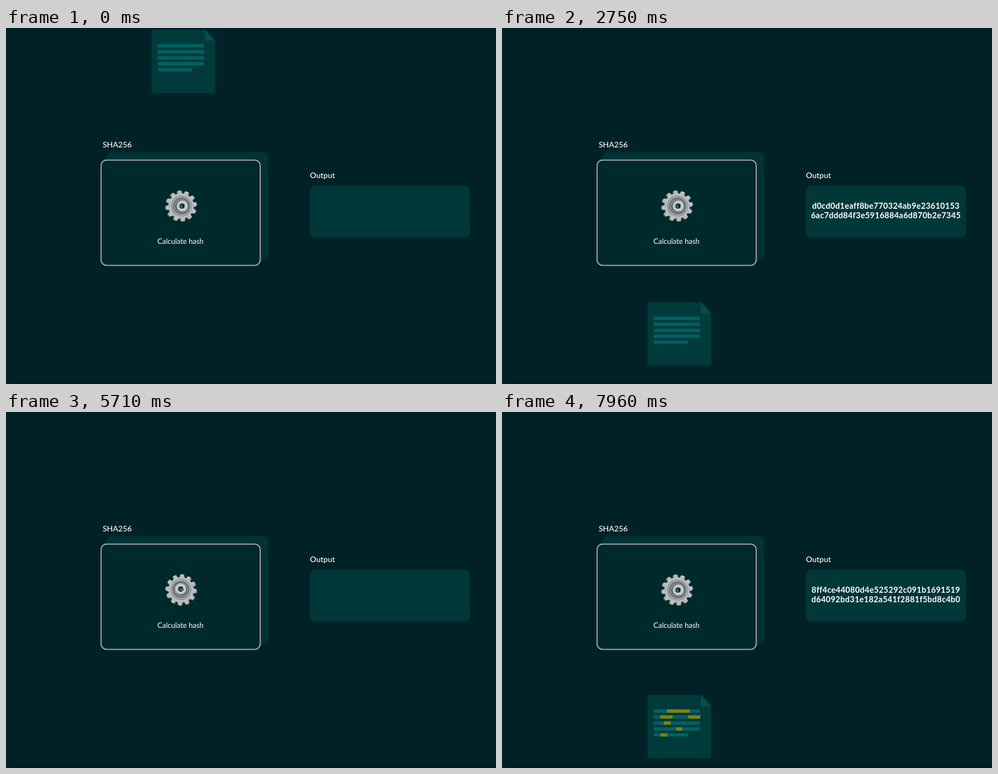
Recreate the animation shown at these times as an HTML page. Size 877x638 px, loop 8 s.

```html
<!DOCTYPE html>
<html lang="en">
<head>
<meta charset="utf-8">
<title>SHA256 hash</title>
<style>
  html, body { margin: 0; width: 100%; height: 100%; overflow: hidden; background: #002226; }
  svg { display: block; width: 877px; height: 638px; }
  text { font-family: Lato, "Open Sans", sans-serif; fill: #fff; }
  .label { font-size: 14px; font-weight: 500; }
  .hash { font-size: 14.5px; font-weight: 700; letter-spacing: .25px; text-anchor: middle; }

  .doc { animation: travel 4s linear infinite; }
  .gear { animation: spin 4s linear infinite; }
  .pop { transform-origin: 687px 329px; animation: pop 4s linear infinite; }
  .first { animation: first 8s step-end infinite; }
  .second { animation: second 8s step-end infinite; }

  /* Enter from above, vanish into the panel, leave below it. */
  @keyframes travel {
    0%, 1% { transform: translateY(3px); opacity: 1; }
    26% { transform: translateY(108px); opacity: 1; }
    26.01% { transform: translateY(108px); opacity: 0; }
    48.49% { transform: translateY(424px); opacity: 0; }
    48.5% { transform: translateY(424px); opacity: 1; }
    73.5%, 100% { transform: translateY(507px); opacity: 1; }
  }
  @keyframes spin {
    0%, 26% { transform: rotate(0deg); }
    50%, 100% { transform: rotate(360deg); }
  }
  @keyframes pop {
    0%, 48.5% { transform: scale(0); opacity: 0; }
    48.51% { transform: scale(0); opacity: 1; }
    52.5% { transform: scale(1.3); opacity: 1; }
    55% { transform: scale(.94); }
    57%, 100% { transform: scale(1); opacity: 1; }
  }
  @keyframes first { 0% { opacity: 1; } 50%, 100% { opacity: 0; } }
  @keyframes second { 0% { opacity: 0; } 50%, 100% { opacity: 1; } }
</style>
</head>
<body>
<svg viewBox="0 0 877 638">
  <defs>
    <linearGradient id="metal" x1="0" y1="0" x2="1" y2="1">
      <stop offset="0" stop-color="#c3c7c8"/>
      <stop offset="1" stop-color="#b1b7b9"/>
    </linearGradient>
    <g id="cog">
      <circle r="22.5"/>
      <g id="teeth"></g>
    </g>
  </defs>

  <rect width="877" height="638" fill="#002226"/>
  <rect y="636" width="877" height="2" fill="#001b1e"/>

  <g class="doc">
    <path d="M260.7 0H356L374.3 19.5V113.5H260.7Z" fill="#003a3b"/>
    <path d="M356 0L374.3 19.5H356Z" fill="#005052"/>
    <path d="M271.5 29H354M271.5 39.5H354M271.5 50.5H354M271.5 61H354M271.5 71.7H333"
          stroke="#006163" stroke-width="5.8"/>
    <path class="second" d="M295.3 29H336.3M283.3 39.5H305.5M332.8 39.5H355M289.5 50.5H302M311.8 61H322.5M283.5 71.7H295.5"
          stroke="#7d830c" stroke-width="5.8"/>
  </g>

  <path d="M175 236L189 222H457Q469.5 222 469.5 234V407L455 420L300 400Z" fill="#003335"/>
  <rect x="170.2" y="236.7" width="284.8" height="188.8" rx="10" fill="#00292b" stroke="#a3a3a1" stroke-width="2"/>
  <text class="label" x="173" y="214">SHA256</text>
  <text x="312.3" y="387" font-size="13" text-anchor="middle">Calculate hash</text>

  <g transform="translate(313.3 319)">
    <g class="gear">
      <use href="#cog" x="-1.4" y=".5" fill="#54585a"/>
      <use href="#cog" x=".5" fill="url(#metal)"/>
      <circle cx=".7" r="18.8" fill="#878d8f"/>
      <circle cx="1" r="17" fill="#b0b5b6"/>
      <circle cx=".9" r="15.3" fill="#636a6d"/>
      <circle cx=".3" r="12.8" fill="#858c8f"/>
      <circle cx=".3" cy=".4" r="10.5" fill="#5a6164"/>
      <circle cx="2" r="9.8" fill="#c4cacd"/>
      <circle cx="1.8" r="4.8" fill="#17272e"/>
      <path d="M2 -3A3.6 3.6 0 0 0 2 4Z" fill="#547b90"/>
    </g>
  </g>

  <text class="label" x="544" y="269">Output</text>
  <rect x="544" y="282" width="286.3" height="94" rx="10" fill="#003738"/>
  <g class="pop">
    <g class="hash first">
      <text x="687" y="324">d0cd0d1eaff8be770324ab9e23610153</text>
      <text x="687" y="341">6ac7ddd84f3e5916884a6d870b2e7345</text>
    </g>
    <g class="hash second">
      <text x="687" y="324">8ff4ce44080d4e525292c091b1691519</text>
      <text x="687" y="341">d64092bd31e182a541f2881f5bd8c4b0</text>
    </g>
  </g>
</svg>
<script>
  const teeth = document.getElementById("teeth");
  for (let i = 0; i < 12; i++) {
    const tooth = document.createElementNS("http://www.w3.org/2000/svg", "path");
    tooth.setAttribute("d", "M-4.6 -21L-3.4 -26.6Q-3 -27.8 -1.8 -27.8H1.8Q3 -27.8 3.4 -26.6L4.6 -21Z");
    tooth.setAttribute("transform", `rotate(${i * 30 - 7})`);
    teeth.append(tooth);
  }
</script>
</body>
</html>
```
